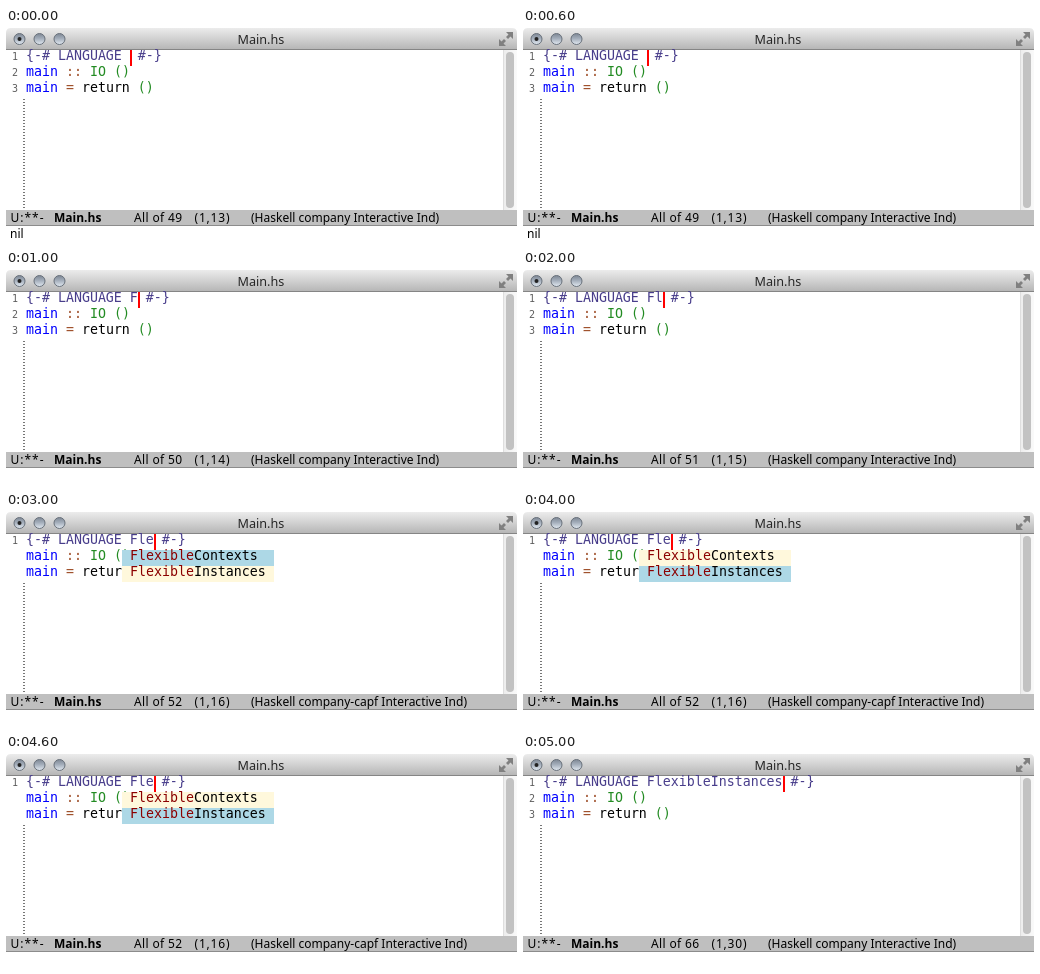
These frames come from a looping animation (511x214 px, 6 s). An HTML page:

```html
<!DOCTYPE html>
<html lang="en">
<head>
<meta charset="utf-8">
<title>Main.hs</title>
<style>
  html, body { margin: 0; width: 100%; height: 100%; overflow: hidden; background: #fff; }
  svg { display: block; width: 100vw; height: 100vh; }
  text { white-space: pre; }
  .ui { font: 500 12px "Noto Sans", sans-serif; }
  .code { font: 13.288px "DejaVu Sans Mono", monospace; }
  .num { font: 10px "DejaVu Sans Mono", monospace; fill: #5f5f5f; }
  .pragma { fill: #483d8b; }
  .fn { fill: #00f; }
  .op { fill: #a0522d; }
  .type { fill: #228b22; }
  .match { fill: #8b0000; }
</style>
</head>
<body>
<svg viewBox="0 0 511 214">
  <defs>
    <linearGradient id="bar" x2="0" y2="1">
      <stop offset="0" stop-color="#ececec"/>
      <stop offset="1" stop-color="#b4b4b4"/>
    </linearGradient>
    <linearGradient id="button" x2="0" y2="1">
      <stop offset="0" stop-color="#7d8794"/>
      <stop offset=".45" stop-color="#a3adba"/>
      <stop offset="1" stop-color="#e2eaf2"/>
    </linearGradient>
    <linearGradient id="track">
      <stop offset="0" stop-color="#ececec"/>
      <stop offset="1" stop-color="#fafafa"/>
    </linearGradient>
  </defs>
  <rect width="511" height="214" fill="#fff"/>

  <path d="M0 22V5Q0 0 5 0H506Q511 0 511 5V22Z" fill="url(#bar)"/>
  <path d="M0 21.5H511" stroke="#858585"/>
  <g fill="url(#button)" stroke="#69717b">
    <circle cx="13.5" cy="11" r="5.5"/>
    <circle cx="33.5" cy="11" r="5.5"/>
    <circle cx="53.5" cy="11" r="5.5"/>
  </g>
  <circle cx="13.5" cy="11" r="2" fill="#222"/>
  <text x="231.5" y="16" class="ui" style="font-size:12.6px" fill="#262626">Main.hs</text>
  <g fill="#808080">
    <path d="M500 4H507V11L504.5 8.5L502 11L500 9L502.5 6.5Z"/>
    <path d="M493 11V18H500L497.5 15.5L500 13L498 11L495.5 13.5Z"/>
  </g>

  <rect x="497" y="22" width="14" height="160" fill="url(#track)"/>
  <path d="M497.5 22V182" stroke="#dedede"/>
  <rect x="500" y="24" width="8" height="156" rx="4" fill="#c2c2c2"/>

  <text x="6" y="32" class="num">1</text>
  <g id="lowerNums" class="num">
    <text x="6" y="48">2</text>
    <text x="6" y="64">3</text>
  </g>
  <path d="M18 71V182" stroke="#777" stroke-width="2" stroke-dasharray="1 2"/>

  <g class="code">
    <text id="pragma" x="20" y="32" class="pragma"></text>
    <text x="20" y="48"><tspan class="fn">main</tspan> <tspan class="op">::</tspan> <tspan class="type">IO ()</tspan></text>
    <text x="20" y="64"><tspan class="fn">main</tspan> <tspan class="op">=</tspan> return <tspan class="type">()</tspan></text>
    <g id="popup">
      <rect id="row0" x="116" y="38" width="152" height="16"/>
      <rect id="row1" x="116" y="54" width="152" height="16"/>
      <text x="124" y="48"><tspan class="match">Flexible</tspan>Contexts</text>
      <text x="124" y="64"><tspan class="match">Flexible</tspan>Instances</text>
    </g>
  </g>
  <rect id="cursor" y="22" width="2" height="16" fill="#f00"/>

  <rect y="182" width="511" height="16" fill="#bfbfbf"/>
  <path d="M0 197.5H511" stroke="#8c8c8c"/>
  <g class="ui">
    <text x="4.5" y="194" letter-spacing="1">U:**-</text>
    <text x="48" y="194" font-weight="700">Main.hs</text>
    <text id="size" x="128" y="194" letter-spacing=".35"></text>
    <text id="place" x="188.5" y="194" letter-spacing=".8"></text>
    <text id="modes" x="245" y="194"></text>
    <text id="echo" x="4" y="210">nil</text>
  </g>
</svg>
<script>
  const STEP = 1000;
  const typed = ["", "F", "Fl", "Fle", "Fle", "FlexibleInstances"];
  const $ = id => document.getElementById(id);
  const show = (id, on) => $(id).setAttribute("visibility", on ? "visible" : "hidden");
  let last = -1;

  function draw(step) {
    const word = typed[step], n = word.length;
    const open = step === 3 || step === 4;
    const choice = step - 3;

    $("pragma").textContent = `{-# LANGUAGE ${word} #-}`;
    $("cursor").setAttribute("x", 124 + 8 * n);
    $("size").textContent = `All of ${49 + n}`;
    $("place").textContent = `(1,${13 + n})`;
    $("modes").textContent = `(Haskell company${open ? "-capf" : ""} Interactive Ind)`;

    show("popup", open);
    show("lowerNums", !open);
    show("echo", step === 0);
    for (const i of [0, 1]) {
      $("row" + i).setAttribute("fill", i === choice ? "#add8e6" : "#fff8dc");
    }
  }

  function tick() {
    const step = Math.floor(performance.now() / STEP) % typed.length;
    if (step !== last) draw(last = step);
    requestAnimationFrame(tick);
  }
  tick();
</script>
</body>
</html>
```
